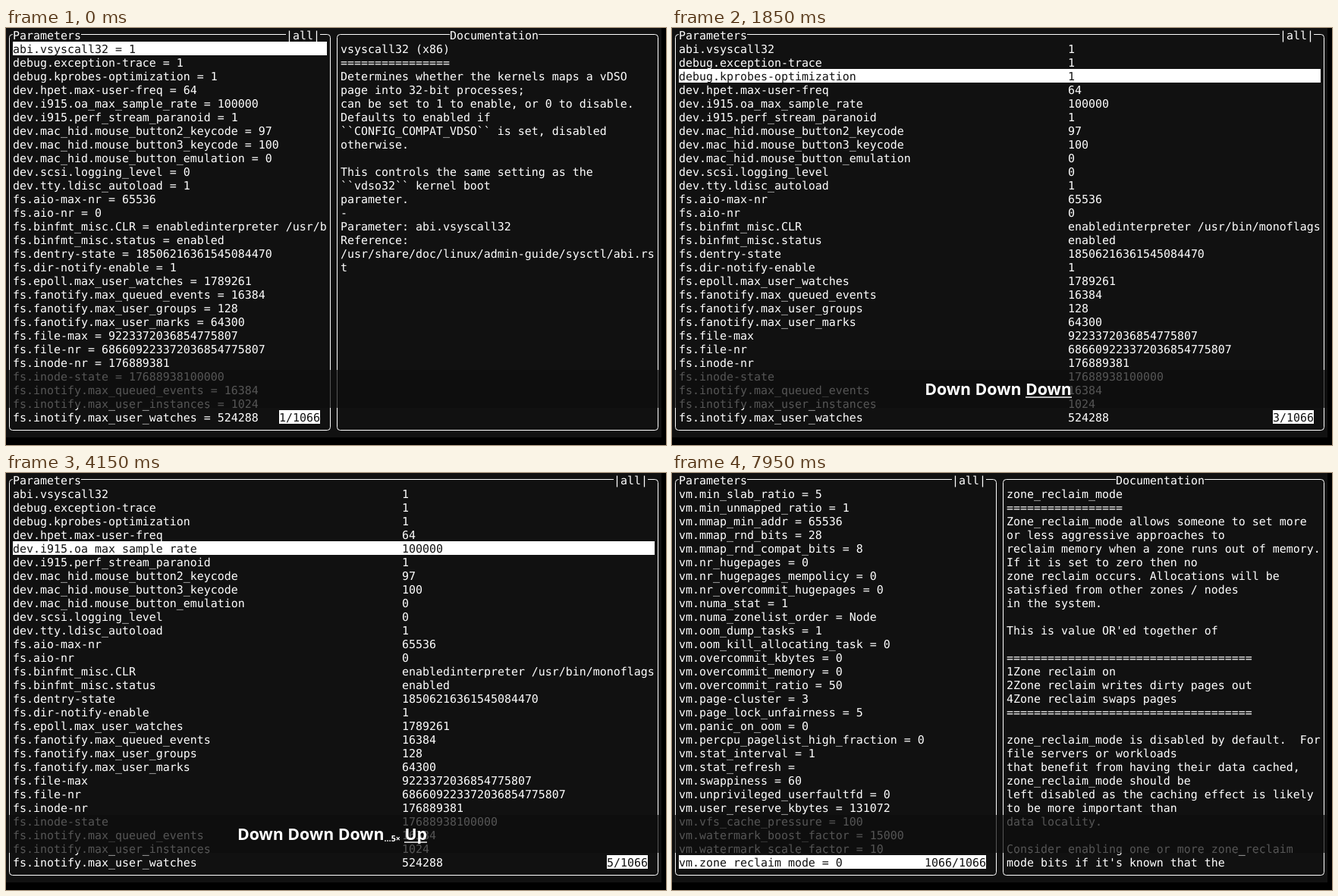
An HTML page for the animation above (8000 ms loop, 870 by 550 pixels).

```html
<!DOCTYPE html>
<html lang="en">
<head>
<meta charset="utf-8">
<title>Kernel parameters</title>
<style>
  html, body { margin: 0; width: 100%; height: 100%; overflow: hidden; background: #000; }
  #terminal { position: absolute; left: 0; top: 0; background: #111; }
  #terminal text {
    font: 14.95px "DejaVu Sans Mono", monospace;
    white-space: pre;
    text-rendering: geometricPrecision;
  }
  #band { position: absolute; left: 0; top: 451px; width: 864px; height: 50px; background: rgba(13, 13, 13, .7); }
  #keys {
    position: absolute; left: 0; top: 450px; width: 860px; height: 51px;
    font: bold 21.33px/51px "Noto Sans", "Open Sans", sans-serif;
    color: #fff; text-align: center; white-space: pre;
  }
  #keys small { font-size: .5em; line-height: 0; vertical-align: -2px; }
  #keys u { position: relative; text-decoration: none; }
  #keys u::after {
    content: ""; position: absolute; left: 0; right: 0; top: 25px;
    height: 2px; background: rgba(255, 255, 255, .7);
  }
</style>
</head>
<body>
<svg id="terminal" width="864" height="540"></svg>
<div id="band"></div>
<div id="keys"></div>
<script>
const LOOP = 8000, CELL_W = 9, CELL_H = 18, TOTAL = 1066;
const FG = "#fff", BG = "#111";

const firstParams = `abi.vsyscall32=1
debug.exception-trace=1
debug.kprobes-optimization=1
dev.hpet.max-user-freq=64
dev.i915.oa_max_sample_rate=100000
dev.i915.perf_stream_paranoid=1
dev.mac_hid.mouse_button2_keycode=97
dev.mac_hid.mouse_button3_keycode=100
dev.mac_hid.mouse_button_emulation=0
dev.scsi.logging_level=0
dev.tty.ldisc_autoload=1
fs.aio-max-nr=65536
fs.aio-nr=0
fs.binfmt_misc.CLR=enabledinterpreter /usr/bin/monoflags
fs.binfmt_misc.status=enabled
fs.dentry-state=18506216361545084470
fs.dir-notify-enable=1
fs.epoll.max_user_watches=1789261
fs.fanotify.max_queued_events=16384
fs.fanotify.max_user_groups=128
fs.fanotify.max_user_marks=64300
fs.file-max=9223372036854775807
fs.file-nr=686609223372036854775807
fs.inode-nr=176889381
fs.inode-state=17688938100000
fs.inotify.max_queued_events=16384
fs.inotify.max_user_instances=1024
fs.inotify.max_user_watches=524288`;

const lastParams = `vm.min_slab_ratio=5
vm.min_unmapped_ratio=1
vm.mmap_min_addr=65536
vm.mmap_rnd_bits=28
vm.mmap_rnd_compat_bits=8
vm.nr_hugepages=0
vm.nr_hugepages_mempolicy=0
vm.nr_overcommit_hugepages=0
vm.numa_stat=1
vm.numa_zonelist_order=Node
vm.oom_dump_tasks=1
vm.oom_kill_allocating_task=0
vm.overcommit_kbytes=0
vm.overcommit_memory=0
vm.overcommit_ratio=50
vm.page-cluster=3
vm.page_lock_unfairness=5
vm.panic_on_oom=0
vm.percpu_pagelist_high_fraction=0
vm.stat_interval=1
vm.stat_refresh=
vm.swappiness=60
vm.unprivileged_userfaultfd=0
vm.user_reserve_kbytes=131072
vm.vfs_cache_pressure=100
vm.watermark_boost_factor=15000
vm.watermark_scale_factor=10
vm.zone_reclaim_mode=0`;

const firstDoc = `vsyscall32 (x86)
${"=".repeat(16)}
Determines whether the kernels maps a vDSO
page into 32-bit processes;
can be set to 1 to enable, or 0 to disable.
Defaults to enabled if
\`\`CONFIG_COMPAT_VDSO\`\` is set, disabled
otherwise.

This controls the same setting as the
\`\`vdso32\`\` kernel boot
parameter.
-
Parameter: abi.vsyscall32
Reference:
/usr/share/doc/linux/admin-guide/sysctl/abi.rs
t`;

const lastDoc = `zone_reclaim_mode
${"=".repeat(17)}
Zone_reclaim_mode allows someone to set more
or less aggressive approaches to
reclaim memory when a zone runs out of memory.
If it is set to zero then no
zone reclaim occurs. Allocations will be
satisfied from other zones / nodes
in the system.

This is value OR'ed together of

${"=".repeat(36)}
1Zone reclaim on
2Zone reclaim writes dirty pages out
4Zone reclaim swaps pages
${"=".repeat(36)}

zone_reclaim_mode is disabled by default.  For
file servers or workloads
that benefit from having their data cached,
zone_reclaim_mode should be
left disabled as the caching effect is likely
to be more important than
data locality.

Consider enabling one or more zone_reclaim
mode bits if it's known that the`;

// [time, selected parameter]
const selections = [[0, 1], [950, 2], [1450, 3], [1900, 4], [2350, 5], [2800, 6], [4150, 5], [6300, TOTAL]];

// [time, earlier keys, newest key]; the newest key is underlined briefly
const UNDERLINE_MS = 200;
const repeats = n => `<small>…${n}×</small>`;
const presses = [
  [0, "", ""],
  [900, "", "Down"],
  [1400, "Down ", "Down"],
  [1850, "Down Down ", "Down"],
  [2300, "Down Down Down", repeats(4)],
  [2750, "Down Down Down", repeats(5)],
  [4150, `Down Down Down${repeats(5)} `, "Up"],
  [5850, "", ""],
  [6250, "", "b"],
  [7950, "", ""],
];

const fill = (col, row, cols, color) =>
  `<rect x="${col * CELL_W}" y="${row * CELL_H}" width="${cols * CELL_W}" height="${CELL_H}" fill="${color}"/>`;

const print = (col, row, text, color = FG) =>
  `<text x="${col * CELL_W}" y="${row * CELL_H + 15}" fill="${color}">${text}</text>`;

const label = (col, row, text, color = FG, back = BG) =>
  fill(col, row, text.length, back) + print(col, row, text, color);

const frame = (left, right) =>
  `<rect x="${left * CELL_W + 4.5}" y="8.5" width="${(right - left) * CELL_W}" height="522" rx="4" fill="none" stroke="${FG}"/>`;

function parameterPane(selected, right, wide) {
  const atEnd = selected === TOTAL;
  const rows = (atEnd ? lastParams : firstParams).split("\n");
  const selectedRow = atEnd ? rows.length : selected;
  const counter = `${selected}/${TOTAL}`;
  let out = frame(0, right) + label(1, 0, "Parameters") + label(right - 6, 0, "|all|");
  out += fill(1, selectedRow, right - (atEnd ? 2 : 1), FG);
  rows.forEach((line, i) => {
    const row = i + 1, color = row === selectedRow ? BG : FG;
    const [name, value] = line.split("=");
    out += wide
      ? print(1, row, name, color) + print(58, row, value, color)
      : print(1, row, `${name} = ${value}`.slice(0, right - 1), color);
  });
  return out + label(right - 1 - counter.length, rows.length, counter, BG, FG);
}

function documentationPane(doc) {
  return frame(48, 95) + label(65, 0, "Documentation") +
    doc.split("\n").map((line, i) => print(49, i + 1, line)).join("");
}

function screen(selected) {
  if (selected > 1 && selected < TOTAL) return parameterPane(selected, 95, true);
  return parameterPane(selected, 47, false) + documentationPane(selected === 1 ? firstDoc : lastDoc);
}

const latest = (list, t) => list.findLast(([start]) => start <= t);

function updater(id) {
  const element = document.getElementById(id);
  let shown;
  return (key, build) => {
    if (key === shown) return;
    shown = key;
    element.innerHTML = build(key);
  };
}
const updateTerminal = updater("terminal"), updateKeys = updater("keys");

function draw(now) {
  const t = now % LOOP;
  updateTerminal(latest(selections, t)[1], screen);
  const [start, before, key] = latest(presses, t);
  updateKeys(before + (key && t < start + UNDERLINE_MS ? `<u>${key}</u>` : key), html => html);
  requestAnimationFrame(draw);
}
draw(performance.now());
</script>
</body>
</html>
```
